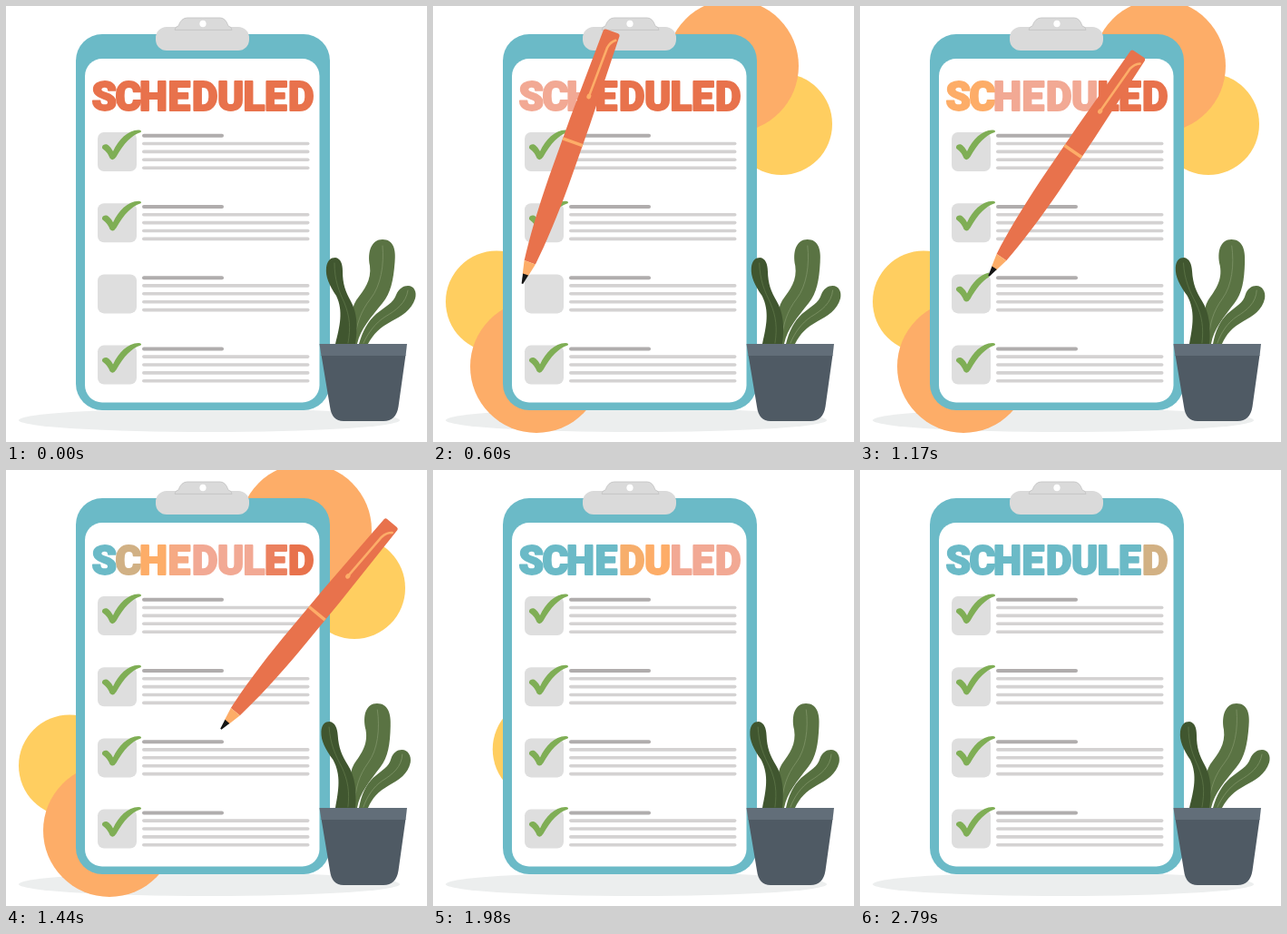
An HTML page with a canvas for the animation above (2.82 s loop, 464 px wide and 480 px high).

```html
<!DOCTYPE html>
<html lang="en">
<head>
<meta charset="utf-8">
<title>Scheduled</title>
<style>
html, body { margin: 0; width: 100%; height: 100%; overflow: hidden; background: #fff; }
canvas { display: block; width: 464px; height: 480px; }
</style>
</head>
<body>
<canvas id="stage" width="464" height="480"></canvas>
<script>
const ctx = document.getElementById('stage').getContext('2d');
const LOOP = 2820;
const ROW = 78.2;
const RED = [232, 114, 76], PINK = [242, 169, 148], ORANGE = [253, 173, 104], TEAL = [107, 186, 199];
const css = c => `rgb(${c.map(Math.round).join()})`;
const clamp = u => Math.max(0, Math.min(1, u));
const lerp = (a, b, u) => a + (b - a) * u;
const mix = (a, b, u) => a.map((v, i) => lerp(v, b[i], u));
const span = (t, start, dur) => clamp((t - start) / dur);
const ease = u => u < .5 ? 2 * u * u : 1 - 2 * (1 - u) * (1 - u);

function box(x, y, w, h, r, color) {
  ctx.fillStyle = color;
  ctx.beginPath();
  ctx.roundRect(x, y, w, h, r);
  ctx.fill();
}

function disc(x, y, rx, ry, color) {
  ctx.fillStyle = color;
  ctx.beginPath();
  ctx.ellipse(x, y, rx, ry, 0, 0, Math.PI * 2);
  ctx.fill();
}

function line(x1, x2, y, width, color) {
  box(x1, y - width / 2, x2 - x1, width, width / 2, color);
}

function shape(d, color) {
  ctx.fillStyle = color;
  ctx.fill(new Path2D(d));
}

function outline(d, color, width) {
  ctx.strokeStyle = color;
  ctx.lineWidth = width;
  ctx.lineCap = ctx.lineJoin = 'round';
  ctx.stroke(new Path2D(d));
}

// Discs slide out from behind the board and back; dx, dy lead to the hiding place.
const discs = [
  { x: 384, y: 130, r: 56, dx: -84, dy: 62, show: 0, hide: 1572, color: '#ffce60' },
  { x: 330, y: 66, r: 73, dx: -60, dy: 75, show: 154, hide: 1730, color: css(ORANGE) },
  { x: 70, y: 325.500, r: 56, dx: 66, dy: -23, show: 154, hide: 1745, color: '#ffce60' },
  { x: 114, y: 397, r: 73, dx: 38, dy: -42, show: 0, hide: 1610, color: css(ORANGE) }
];

function drawDiscs(t) {
  for (const d of discs) {
    const out = 1 - ease(span(t, d.show, 350)) + ease(span(t, d.hide, 350));
    if (out < 1) disc(d.x + d.dx * out, d.y + d.dy * out, d.r, d.r, d.color);
  }
}

function drawBoard() {
  box(77, 31, 280, 414, 29, css(TEAL));
  box(87, 58, 258.5, 378.5, 19, '#fff');
  shape('M186 27V25Q186 23 190 22Q193 13 200 13H236Q242 13 245 22Q249 23 249 27Z', '#dadada');
  box(165, 23, 103, 26, 12, '#dadada');
  outline('M186 26Q186 23 190 22Q193 13 200 13H236Q242 13 245 22Q249 23 249 26Z', '#c2c2c2', .8);
  disc(217, 19.5, 3.6, 3.8, '#fff');
}

const letters = [...'SCHEDULED'];
const centers = [108.5, 135, 162.5, 191.5, 219.5, 247.5, 274.5, 298, 325.5];

function letterColor(i, t) {
  let c = mix(RED, PINK, span(t, 200 * i, 150));
  c = mix(c, ORANGE, span(t, 770 + 205 * i, 150));
  return css(mix(c, TEAL, span(t, 1202 + 193 * i, 150)));
}

function drawTitle(t) {
  ctx.font = '900 44px Roboto, "Open Sans", sans-serif';
  ctx.lineJoin = 'round';
  ctx.lineWidth = 2;
  letters.forEach((ch, i) => {
    const m = ctx.measureText(ch);
    const x = centers[i] - (m.actualBoundingBoxRight - m.actualBoundingBoxLeft) / 2;
    ctx.fillStyle = ctx.strokeStyle = letterColor(i, t);
    ctx.fillText(ch, x, 114.6);
    ctx.strokeText(ch, x, 114.6);
  });
}

const TICK = 'M106 155C106.500 152 111 151.500 113 153.500Q116 156 118 160C124 147 134 137 146 136.500' +
  'Q150.500 137 148.500 139C138 142.500 130 151 121.500 166Q118 171.500 114.500 167.500Q112 161 107 157.500Q105.500 156.500 106 155Z';

function drawRows(t, tipX) {
  for (let i = 0; i < 4; i++) {
    ctx.save();
    ctx.translate(0, i * ROW);
    box(101, 139, 43, 43, 7, '#dedede');
    line(150, 240, 142.8, 4, '#b0adad');
    for (let k = 0; k < 4; k++) line(150, 334.5, 151.5 + k * 8.9, 3.6, '#d4d2d2');
    if (i === 2) {
      ctx.beginPath();
      ctx.rect(0, 130, t < 700 ? 0 : t < 1230 ? tipX : 464, 50);
      ctx.clip();
    }
    shape(TICK, '#7fae55');
    ctx.restore();
  }
}

// Pen tip position and tilt in degrees.
function penPose(t) {
  if (t < 700) {
    const u = ease(span(t, 60, 640));
    return { x: lerp(-50, 106, u), y: lerp(186, 312, u), a: lerp(2, 20.5, u) };
  }
  if (t < 810) {
    const u = span(t, 700, 110);
    return { x: lerp(106, 117, u), y: lerp(312, 324, u), a: lerp(20.5, 21.3, u) };
  }
  if (t < 1230) {
    const u = span(t, 810, 420), v = 1 - u;
    const curve = (p, q, r) => v * v * p + 2 * u * v * q + u * u * r;
    return { x: curve(117, 126, 148), y: curve(324, 305, 294), a: lerp(21.3, 36.2, u) };
  }
  const u = span(t, 1230, 415) ** 2;
  return { x: lerp(148, 495, u), y: lerp(294, 260, u), a: lerp(36.2, 50, u) };
}

function drawPen(p) {
  ctx.save();
  ctx.translate(p.x, p.y);
  ctx.rotate(p.a * Math.PI / 180);
  shape('M-6.500 -25C-9.500 -50 -11.500 -85 -11.700 -120L-11.500 -190L-9.500 -293Q-9 -295 -7 -295H7Q9 -295 9.500 -293L11.500 -190L11.700 -120C11.500 -85 9.500 -50 6.500 -25Z', css(RED));
  shape('M-6.500 -25L-3.200 -10H3.200L6.500 -25Z', css(ORANGE));
  shape('M-3.200 -11L-.8 0H.8L3.200 -11Z', '#151515');
  shape('M-11.500 -167.500H11.500V-164H-11.500Z', css(ORANGE));
  outline('M0 -220L1 -276Q2 -283 7 -287', css(ORANGE), 2.6);
  disc(0, -219, 2.4, 3, css(ORANGE));
  ctx.restore();
}

const leaves = [
  { h: 114, color: '#5a7343', rib: '#7f9468',
    d: 'M380 372C381 350 379 335 386 324C395 312 403 302 401 286C398 270 403 257 415 257C427 257 430 268 428.500 282C427 302 424 316 415 327C402 343 391 355 387 372Z',
    ribD: 'M415 264C417 285 413 308 402 322C391 336 386 350 384 371' },
  { h: 57, color: '#567040', rib: '#7f9468',
    d: 'M389 372C393 358 399 347 408 339C419 330 427 327 430 318C433 311 438 308 443 308C450 308 453 315 451 322C447 335 436 341 425 347C412 354 405 361 399 372Z',
    ribD: 'M443 313C441 327 430 335 418 342C407 349 399 360 394 371' },
  { h: 90, color: '#40562f', rib: '#5f7749',
    d: 'M363 372C368 352 372 336 364 319C356 307 352 298 353 288C354 280 358 277 363 277C369 278 371 284 371 292C371 306 374 314 380 325C387 337 388 354 385 372Z',
    ribD: 'M362 283C362 302 367 314 373 327C379 342 380 354 377 371' }
];

function drawPlant(t) {
  const sway = 3 * (Math.cos(2 * Math.PI * t / LOOP) - 1);
  for (const leaf of leaves) {
    const k = sway / leaf.h;
    ctx.save();
    ctx.transform(1, 0, -k, 1, k * 372, 0);
    shape(leaf.d, leaf.color);
    outline(leaf.ribD, leaf.rib, .8);
    ctx.restore();
  }
  shape('M347.500 384H440.500L432.500 441Q430 457 416 457H372Q359 457 357 441Z', '#4f5a64');
  shape('M345.500 372H442L440.500 385H347.500Z', '#626e79');
}

function draw(t) {
  const pen = penPose(t);
  ctx.fillStyle = '#fff';
  ctx.fillRect(0, 0, 464, 480);
  disc(224, 456, 210, 13, '#eceeee');
  drawDiscs(t);
  drawBoard();
  drawTitle(t);
  drawRows(t, pen.x);
  drawPlant(t);
  if (t > 60 && t < 1645) drawPen(pen);
}

const began = performance.now();
function tick() {
  const t = (performance.now() - began) % LOOP;
  draw(Math.floor(t / 30) * 30);
  requestAnimationFrame(tick);
}
tick();
</script>
</body>
</html>
```
